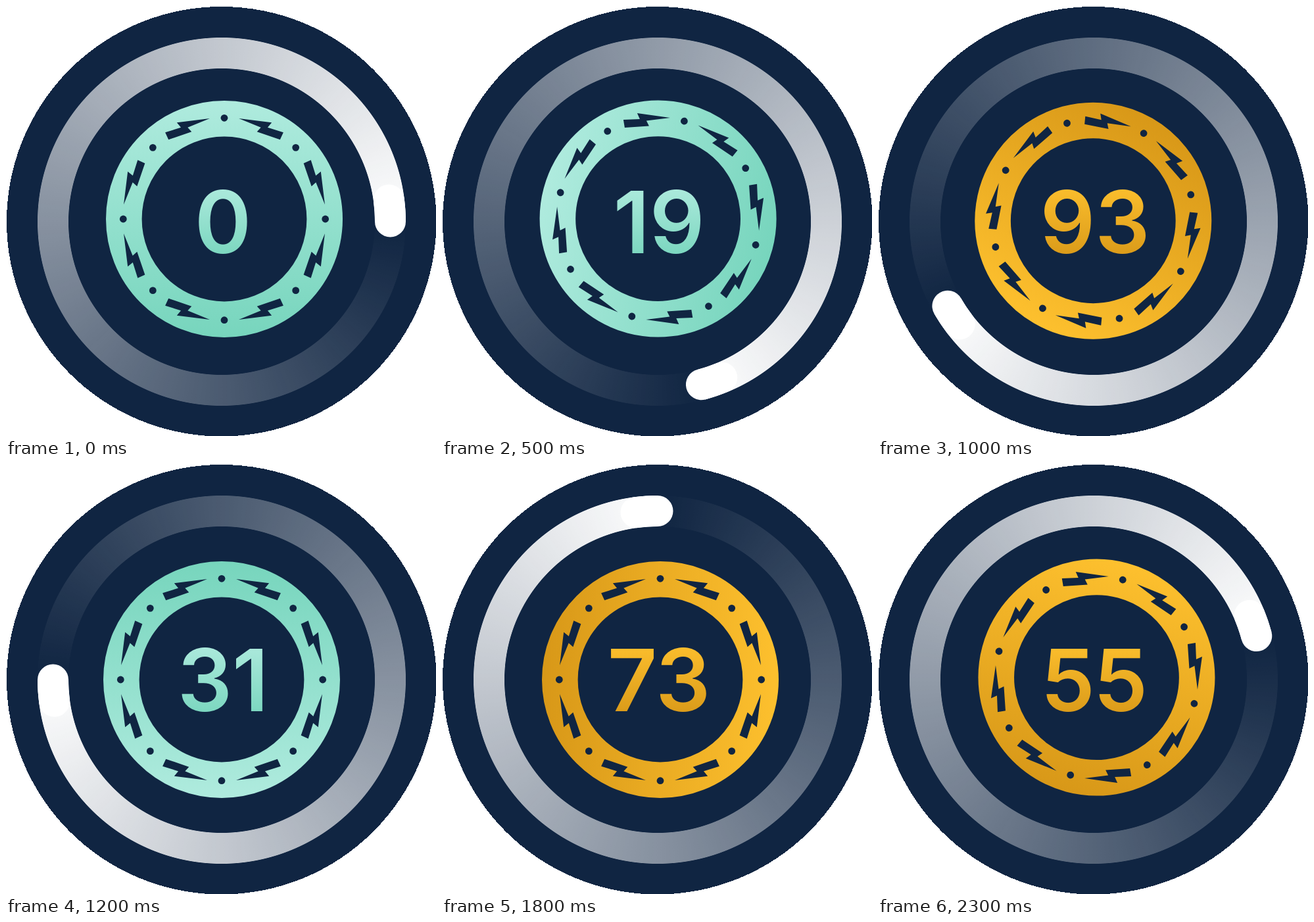
Write an HTML page that moves like this. It is 654 px wide and 654 px high and loops after 2.4 s.

```html
<!DOCTYPE html>
<html lang="en">
<head>
<meta charset="utf-8">
<title>Spinning chip</title>
<style>
  html, body { margin: 0; width: 100%; height: 100%; overflow: hidden; background: #fff; }
  #stage { position: relative; width: 654px; height: 654px; overflow: hidden; }
  svg { position: absolute; left: 0; top: 0; }
  #trail {
    position: absolute; left: 47px; top: 47px; width: 562px; height: 562px;
    background: conic-gradient(from 90deg, rgba(255,255,255,0), #fff);
    -webkit-mask: radial-gradient(circle, transparent 232.6px, #000 233.4px, #000 279.6px, transparent 280.4px);
    mask: radial-gradient(circle, transparent 232.6px, #000 233.4px, #000 279.6px, transparent 280.4px);
  }
  #number { font: 600 131px Inter, "Open Sans", sans-serif; text-anchor: middle; }
</style>
</head>
<body>
<div id="stage">
  <svg width="654" height="654">
    <circle cx="327.75" cy="327.75" r="326.75" fill="#102542" shape-rendering="crispEdges"/>
  </svg>
  <div id="trail"></div>
  <svg width="654" height="654">
    <defs id="defs"></defs>
    <path id="head" fill="none" stroke="#fff" stroke-width="47" stroke-linecap="round"/>
    <g id="chip">
      <g transform="translate(332 324)">
        <circle id="rim" r="152.7" fill="none" stroke-width="54.6"/>
        <g id="marks" fill="#102542"></g>
      </g>
    </g>
    <text id="number" x="330" y="376"></text>
  </svg>
</div>
<script>
  const STEP = 100, STEPS = 24, TURN = 15;
  const HUES = { green: ['#afebde', '#77d5bd'], gold: ['#fdc02e', '#d89818'] };
  // first step, number
  const NUMBERS = [[0, 0], [3, 19], [6, 93], [12, 31], [15, 45], [18, 73], [21, 55]];
  const BOLT = '-52.7,-150.5 -27.7,-151.5 -31.7,-160.5 18.3,-153.5 -17.7,-149 -13.7,-141 -50.7,-138.5';
  const $ = id => document.getElementById(id);

  // A gradient per hue for the rim and for the number
  const gradient = (id, [light, dark], top, bottom) =>
    `<linearGradient id="${id}" gradientUnits="userSpaceOnUse" x1="0" x2="0" y1="${top}" y2="${bottom}">
      <stop stop-color="${light}"/><stop offset="1" stop-color="${dark}"/></linearGradient>`;
  $('defs').innerHTML = Object.entries(HUES).map(([name, hue]) =>
    gradient(name + 'Rim', hue, -180, 180) + gradient(name + 'Text', hue, 270, 388)).join('');

  // Each quarter: two dots and a mirrored pair of bolts
  const bolt = `<polygon points="${BOLT}" transform="rotate(-15)"/>`;
  const dot = '<circle cy="-153.7" r="5.4"/>';
  $('marks').innerHTML = [0, 90, 180, 270].map(a =>
    `<g transform="rotate(${a})">${dot}<g transform="rotate(45)">${dot}</g>
      ${bolt}<g transform="scale(-1 1)">${bolt}</g></g>`).join('');

  const tail = 7.4 * Math.PI / 180, radius = 256.5;
  $('head').setAttribute('d', `M${328 + radius * Math.cos(tail)} ${328 - radius * Math.sin(tail)}
    A${radius} ${radius} 0 0 1 ${328 + radius} 328`);

  function draw(step) {
    const angle = step * TURN;
    const hue = step % 12 < 6 ? 'green' : 'gold';
    $('trail').style.transform = `rotate(${angle}deg)`;
    $('head').setAttribute('transform', `rotate(${angle} 328 328)`);
    $('chip').setAttribute('transform', `rotate(${-angle} 330 326)`);
    $('rim').setAttribute('stroke', `url(#${hue}Rim)`);
    $('number').setAttribute('fill', `url(#${hue}Text)`);
    $('number').textContent = NUMBERS.filter(([from]) => from <= step).pop()[1];
  }

  const start = performance.now();
  function tick(now) {
    draw(Math.floor(Math.max(0, now - start) / STEP) % STEPS);
    requestAnimationFrame(tick);
  }
  tick(start);
</script>
</body>
</html>
```
